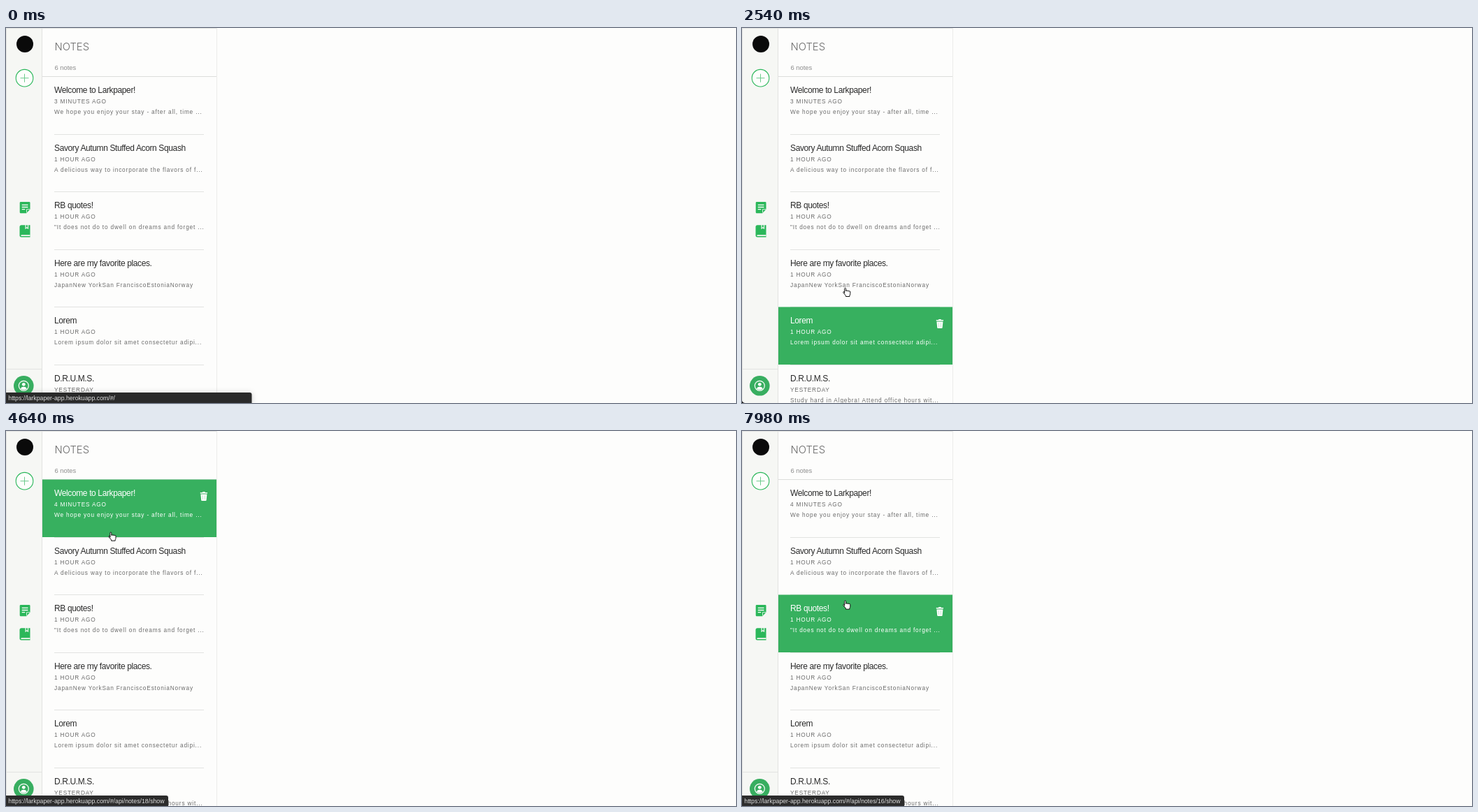
Recreate the animation shown at these times as an HTML page. Size 1044 by 537 pixels, loop 8 s.

```html
<!DOCTYPE html>
<html lang="en">
<head>
<meta charset="utf-8">
<title>Notes</title>
<style>
html, body { margin: 0; width: 100%; height: 100%; overflow: hidden; background: #fdfdfc; }
svg { display: block; font-family: "Liberation Sans", Arial, sans-serif; }
.title { font-size: 12px; letter-spacing: -.375px; fill: #2b2b2b; }
.meta, .text { font-size: 8.3px; letter-spacing: .83px; fill: #6c6c6c; }
.meta { letter-spacing: .78px; }
.on { display: none; }
.active .on { display: inline; }
.active text { fill: #fff; }
.line { fill: #e2e3e1; }
.green { fill: #2bb75a; }
</style>
</head>
<body>
<svg width="1044" height="537" viewBox="0 0 1044 537">
  <defs>
    <g id="trash" fill="#fff">
      <path d="M277.8 18.6h3l.7-1.2h2.800l.7 1.200h3v1.500h-10.200z"/>
      <path d="M278.400 21h9l-.8 8.500q-.1.900-1 .9h-5.400q-.9 0-1-.9z"/>
      <path d="M281.200 22.500l.3 6.300M284.600 22.500l-.3 6.300" stroke="#8fd3a6" stroke-width=".6"/>
    </g>
    <filter id="soft" x="-5%" y="-80%" width="110%" height="260%">
      <feDropShadow dx="0" dy="1" stdDeviation="4" flood-opacity=".2"/>
    </filter>
  </defs>

  <rect width="1044" height="537" fill="#fdfdfc"/>
  <rect width="51" height="537" fill="#f6f7f4"/>
  <rect class="line" width="301" height="1"/>
  <rect class="line" width="1" height="537"/>
  <rect class="line" x="51" width="1" height="537"/>
  <rect x="301" width="1" height="537" fill="#ececea"/>
  <rect class="line" y="488" width="51" height="1"/>
  <rect x="52" y="69" width="249" height="1" fill="#dcdddb"/>

  <circle cx="27" cy="23" r="12" fill="#0a0a0a"/>

  <circle cx="26.5" cy="71.700" r="12.300" fill="#fdfefc" stroke="#2bb75a" stroke-width="1.100"/>
  <path d="M20.500 71.700h12M26.500 65.700v12" stroke="#6dcb8d" fill="none"/>

  <path class="green" d="M21 249h12.300q1.200 0 1.200 1.200v9.300l-5.300 5.700H21q-1.300 0-1.300-1.300v-13.600q0-1.300 1.300-1.300z"/>
  <path d="M22.700 253.300h8.800M22.700 256.500h8.800M22.700 259.700h4.500" stroke="#fff" stroke-width="1.300"/>
  <path d="M29.500 264.500v-4.800h4.700" fill="none" stroke="#fff" stroke-width=".8"/>

  <path class="green" d="M22 282.300h12.500v17.200H22q-2.500 0-2.500-2.500v-12.200q0-2.500 2.500-2.500z"/>
  <path d="M34.500 296.300H22.500q-1.200 0-1.200.9t1.200.9h12z" fill="#f6f7f4"/>
  <path d="M27.500 282v6.300l2.300-1.800 2.300 1.800V282z" fill="#f6f7f4"/>
  <path class="green" d="M28.700 282.300h2.200v3.600l-1.100-.9-1.100.9z"/>

  <circle cx="25.300" cy="512.300" r="14.300" fill="#38ae60"/>
  <circle cx="25.300" cy="512.300" r="7" fill="none" stroke="#fff" stroke-width="1.200"/>
  <circle cx="25.300" cy="510.300" r="2.400" fill="#fff"/>
  <path d="M20.800 516.200q1.400-2.400 4.500-2.400t4.500 2.400q-1.800 2-4.500 2t-4.500-2z" fill="#fff"/>

  <text x="69.500" y="32" style="font:300 14.800px Inter,sans-serif" fill="#6a6a6a">NOTES</text>
  <text x="69.500" y="60" font-size="9.400" fill="#8c8c8c">6 notes</text>

  <g id="notes"></g>
  <path d="M0 533.500q.5 3 4 3.500H0z" fill="#000"/>

  <g id="status">
    <path id="bubble" fill="#2c2c2c"/>
    <text id="url" x="3.300" y="533" font-size="8.750" fill="#dedede"></text>
  </g>

  <path id="hand" fill="#fff" stroke="#111" stroke-width="1" stroke-linejoin="round"
    d="M-3.400 1.300V-4.800q0-1.200 1-1.200t1 1.200v3.300q.1-.9 1-.9 1 0 1.100 1 .1-.7 1-.7 1 0 1.100 1 .2-.5.900-.5 1.100 0 1.100 1.200v2.600q0 1.500-.9 2.600v1.400h-5.500v-1.300l-3.300-3.800q-.7-1-.1-1.600.8-.6 1.600.4z"/>
</svg>
<script>
const $ = id => document.getElementById(id);
const LOOP = 8000, PITCH = 82.5, TOP = 69.5;

const notes = [
  ["Welcome to Larkpaper!", "3 MINUTES AGO", "We hope you enjoy your stay - after all, time ..."],
  ["Savory Autumn Stuffed Acorn Squash", "1 HOUR AGO", "A delicious way to incorporate the flavors of f..."],
  ["RB quotes!", "1 HOUR AGO", "\"It does not do to dwell on dreams and forget ..."],
  ["Here are my favorite places.", "1 HOUR AGO", "JapanNew YorkSan FranciscoEstoniaNorway"],
  ["Lorem", "1 HOUR AGO", "Lorem ipsum dolor sit amet consectetur adipi..."],
  ["D.R.U.M.S.", "YESTERDAY", "Study hard in Algebra! Attend office hours wit..."]
];

$("notes").innerHTML = notes.map(([title, meta, text], i) => {
  const y = TOP + PITCH * i;
  const rule = i ? `<rect class="line" x="69" y="${Math.floor(y)}" width="214" height="1"/>` : "";
  return rule + `<g class="note">
    <rect class="on" x="52" y="${y}" width="249" height="${PITCH}" fill="#37b05f"/>
    <g transform="translate(0 ${y})">
      <text class="title" x="69" y="23.700">${title}</text>
      <text class="meta" x="69" y="38.500">${meta}</text>
      <text class="text" x="69" y="53.500">${text}</text>
      <use class="on" href="#trash"/>
    </g></g>`;
}).join("");

const rows = [...document.querySelectorAll(".note")];
const age = document.querySelector(".meta");

// [time, value] steps
const hover = [[0, -1], [2500, 4], [2570, 3], [2640, 2], [3580, 1], [4300, 0], [6860, 1], [7200, 2]];
const links = [[0, 0], [2820, 16], [3700, 17], [4340, 18], [6900, 17], [7240, 16]];
// [time, x, y] of the pointer
const path = [[2500, 150, 450], [2540, 150, 379], [2700, 150, 268], [3300, 150, 258], [3540, 150, 240],
  [3640, 150, 176], [3660, 150, 173], [3900, 150, 168], [4200, 151, 164], [4400, 152, 151],
  [5400, 153, 151], [6760, 153, 151], [7000, 151, 200], [7400, 150, 246], [7700, 150, 249]];

const clamp = v => Math.max(0, Math.min(1, v));
const stepAt = (list, t) => list.filter(s => s[0] <= t).pop()[1];

function pointerAt(t) {
  const k = path.findIndex(p => p[0] > t);
  if (k < 0) return path[path.length - 1].slice(1);
  const [t0, x0, y0] = path[k - 1], [t1, x1, y1] = path[k];
  const f = (t - t0) / (t1 - t0);
  return [x0 + (x1 - x0) * f, y0 + (y1 - y0) * f];
}

function draw(now) {
  const t = now % LOOP;
  const active = stepAt(hover, t), id = stepAt(links, t);
  rows.forEach((row, i) => row.classList.toggle("active", i === active));
  age.textContent = (t < 3300 ? 3 : 4) + " MINUTES AGO";

  const w = id ? 232 : 351.5;
  $("bubble").setAttribute("d", `M0 522H${w - 3}q3 0 3 3V537H0z`);
  $("status").setAttribute("filter", id ? "" : "url(#soft)");
  $("status").style.opacity = id ? clamp((t - 2820) / 100) : 1 - clamp((t - 20) / 200);
  $("url").textContent = "https://larkpaper-app.herokuapp.com/#/" + (id ? `api/notes/${id}/show` : "");

  const shown = t >= path[0][0];
  $("hand").style.display = shown ? "" : "none";
  if (shown) $("hand").setAttribute("transform", `translate(${pointerAt(t).join(" ")})`);
}

const start = performance.now();
function tick() {
  draw(performance.now() - start);
  requestAnimationFrame(tick);
}
tick();
</script>
</body>
</html>
```
